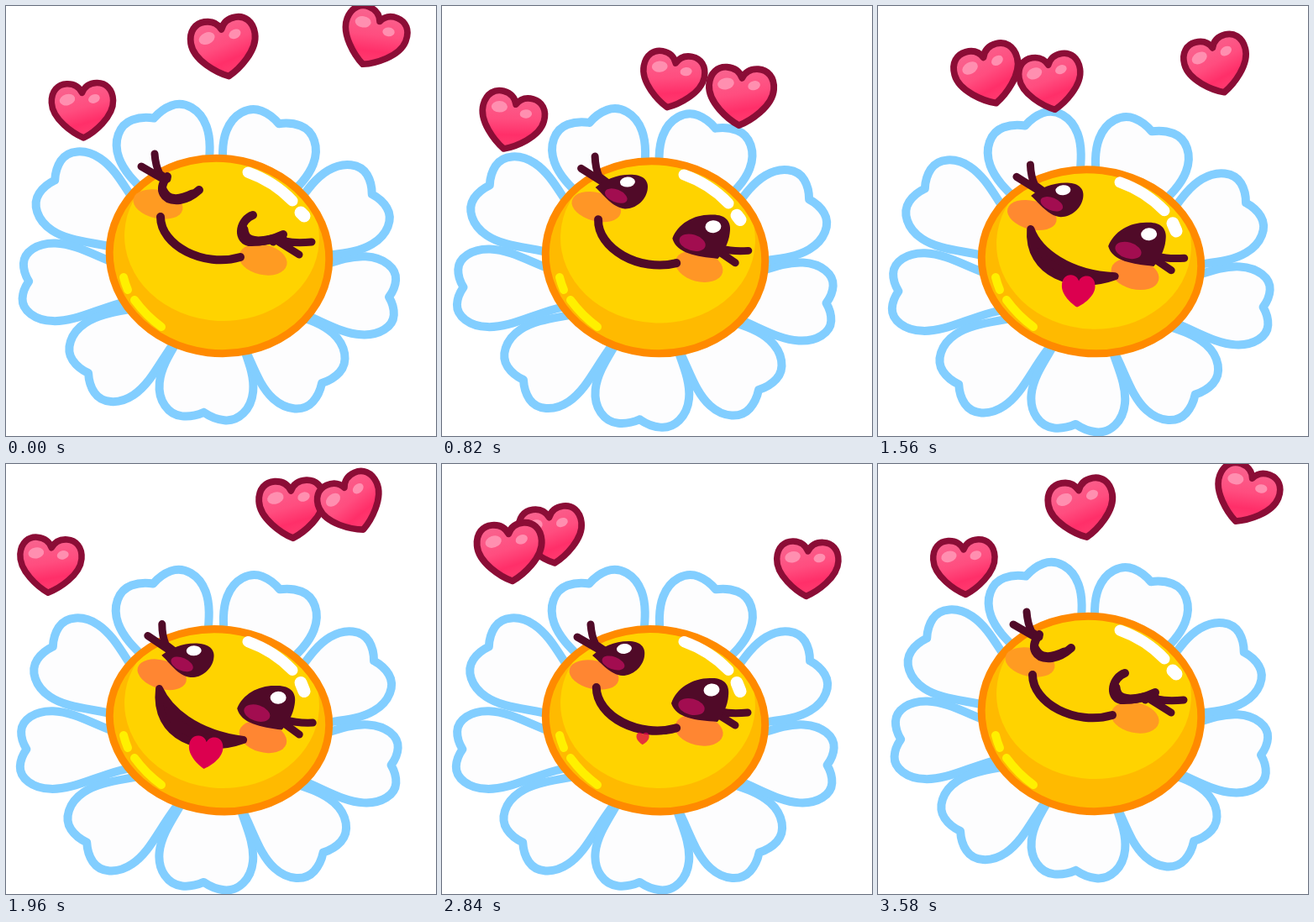
Animation, 512 px wide and 512 px high, one loop 3600 ms. Source, as an HTML page with a canvas:

```html
<!DOCTYPE html>
<html lang="en">
<head>
<meta charset="utf-8">
<title>Happy daisy</title>
<style>
html, body { margin: 0; width: 100%; height: 100%; overflow: hidden; background: #fff; }
canvas { display: block; width: 100vmin; height: 100vmin; }
</style>
</head>
<body>
<canvas id="stage" width="512" height="512"></canvas>
<script>
const ctx = document.getElementById('stage').getContext('2d');
const LOOP = 3600;
const DARK = '#500a28';
const RAD = Math.PI / 180;
const mix = (a, b, k) => a + (b - a) * k;
const cosd = deg => Math.cos(deg * RAD);
const sind = deg => Math.sin(deg * RAD);

function rise(t, from, to) {
  const k = Math.min(1, Math.max(0, (t - from) / (to - from)));
  return k * k * (3 - 2 * k);
}
// Eases up from a to b, holds, eases down from c to d.
const pulse = (t, a, b, c, d) => rise(t, a, b) - rise(t, c, d);

function oval(x, y, rx, ry, turn, color) {
  ctx.beginPath();
  ctx.ellipse(x, y, rx, ry, turn, 0, 2 * Math.PI);
  ctx.fillStyle = color;
  ctx.fill();
}

function line(d, width, color) {
  ctx.lineWidth = width;
  ctx.strokeStyle = color;
  ctx.stroke(new Path2D(d));
}

function blob(d, color) {
  ctx.fillStyle = color;
  ctx.fill(new Path2D(d));
}

function placed(x, y, turn, sx, sy, draw) {
  ctx.save();
  ctx.translate(x, y);
  ctx.rotate(turn);
  ctx.scale(sx, sy);
  draw();
  ctx.restore();
}

function petal(len, half) {
  ctx.beginPath();
  for (const s of [-half, half]) {
    ctx.moveTo(0, 0);
    ctx.lineTo(0, .3 * s);
    ctx.bezierCurveTo(.35 * len, .45 * s, .54 * len, s, .76 * len, s);
    ctx.bezierCurveTo(.9 * len, s, len, .75 * s, len, .45 * s);
    ctx.bezierCurveTo(len, .25 * s, .975 * len, .1 * s, .955 * len, 0);
  }
  ctx.fillStyle = '#fdfdfe';
  ctx.lineWidth = 10;
  ctx.strokeStyle = '#82ceff';
  ctx.fill();
  ctx.stroke();
}

// Nine petal tips sit evenly on an ellipse; every petal points away from a hub below its centre.
function petals(sink) {
  const len = 155, tilt = 2.5;
  for (let i = 0; i < 9; i++) {
    const a = 210 - 40 * i;
    const ex = 225 * cosd(a), ey = 186 * sind(a);
    let x = 243 + ex * cosd(tilt) - ey * sind(tilt);
    let y = 305 + ex * sind(tilt) + ey * cosd(tilt);
    const dir = Math.atan2(y - 335, x - 250);
    x += .012 * sink * (x - 250);
    y += sink * (9 + .014 * (y - 130));
    placed(x - len * Math.cos(dir), y - len * Math.sin(dir), dir, 1, 1,
      () => petal(len, 46 + 10 * Math.abs(Math.sin(dir))));
  }
}

function head(squash) {
  const bottom = 413.5, top = 181.5 + 15.5 * squash;
  const disc = new Path2D();
  disc.ellipse(254, (top + bottom) / 2, 131, (bottom - top) / 2, .12, 0, 2 * Math.PI);
  ctx.fillStyle = '#ffba00';
  ctx.fill(disc);
  ctx.save();
  ctx.clip(disc);
  oval(257, 275 + 11 * squash, 116, 100, .05, '#ffd300');
  ctx.restore();
  ctx.lineWidth = 9;
  ctx.strokeStyle = '#ff8a00';
  ctx.stroke(disc);

  ctx.save();
  ctx.translate(0, 13.5 * squash);
  line('M288 198Q319 209 341 232', 13, '#fff');
  line(`M351 ${246 + squash}L355 ${250 + 7 * squash}`, 15, '#fff');
  ctx.restore();
  line('M140 323Q142 331 145 338', 10, '#fff000');
  line('M153 350Q167 369 185 382', 10, '#fff000');
}

function openEyes(open) {
  placed(210, 216, 0, 1, open, () => {
    blob('M-31 -3C-20 -13 -5 -20 12 -20C26 -20 33 -13 31 -2C29 11 17 21 5 21C-10 20 -20 6 -31 -3Z', DARK);
    oval(-6, 6, 14, 7.5, .35, '#a20d50');
    oval(7, -11, 9, 6, -.1, '#fff');
  });
  placed(308, 265, 0, 1, open, () => {
    blob('M-35 5C-29 -13 -10 -25 11 -25C27 -26 35 -18 33 -4C32 8 27 18 20 27C-6 25 -29 23 -35 5Z', DARK);
    oval(-11, 9, 16, 9.5, .25, '#a20d50');
    oval(13, -11, 9.5, 7.5, -.1, '#fff');
  });
}

function closedEyes() {
  line('M192 203C180 219 187 233 207 231Q219 229 230 219', 10, DARK);
  line('M187 220Q195 237 222 224', 11, DARK);
  line('M294 249C279 254 274 277 289 281Q309 282 330 272', 10, DARK);
  line('M283 266Q284 285 315 278', 11, DARK);
}

// The lips are two curves that coincide when the mouth is closed.
function mouth(open, tongue) {
  const at = (x, y, x2, y2) => `${mix(x, x2, open)} ${mix(y, y2, open)} `;
  const left = at(184, 251, 179, 253), right = at(279, 299, 283, 307);
  const shape = 'M' + left + 'C' + at(184, 285, 192, 277) + at(235, 312, 225, 303) + right +
    'C' + at(235, 312, 235, 328) + at(184, 285, 176, 312) + left + 'Z';
  blob(shape, DARK);
  line(shape, 10 - open, DARK);
  if (tongue < .02) return;
  ctx.globalAlpha = Math.min(1, 2 * tongue);
  placed(239, 304 + 21 * tongue, .03, tongue * .52, tongue * .56, () => {
    ctx.fillStyle = '#dc004f';
    ctx.fill(heartShape);
  });
  ctx.globalAlpha = 1;
}

function face(t, squash) {
  const sway = pulse(t, 0, 480, 480, 1160) + .85 * pulse(t, 1160, 1960, 1960, 2420);
  const open = pulse(t, 580, 740, 3020, 3180);
  const grin = pulse(t, 740, 1900, 2420, 2900);
  const tongue = pulse(t, 740, 1640, 2420, 3140);
  ctx.save();
  ctx.translate(187, 305 + 15 * squash);
  ctx.rotate(.08 * sway);
  ctx.translate(-187, -305);
  const blush = `rgb(255,${Math.round(mix(155, 134, squash))},${Math.round(mix(34, 50, squash))})`;
  oval(181, 236, 30, 17, .22, blush);
  oval(306, 302, 29, 18, .22, blush);
  line('M177 176Q178 190 183 200L192 206', 9, DARK);
  line('M161 191L187 206', 9, DARK);
  line('M318 281Q330 274 332 280Q345 283 364 281', 9, DARK);
  line('M325 281L349 296', 9, DARK);
  if (open > .25) openEyes(open);
  else closedEyes();
  mouth(grin, tongue);
  ctx.restore();
}

const heartShape = new Path2D(
  'M0 35C-13 29 -39 10 -39 -11C-39 -26 -30 -34 -19 -34C-9 -34 -3 -29 0 -22' +
  'C3 -29 9 -34 19 -34C30 -34 39 -26 39 -11C39 10 13 29 0 35Z');
const heartFill = ctx.createLinearGradient(-8, -32, 8, 32);
heartFill.addColorStop(0, '#f9628e');
heartFill.addColorStop(.45, '#ff4d7f');
heartFill.addColorStop(.75, '#ff2f69');
heartFill.addColorStop(1, '#ff3c70');

function heart({ x, y, turn, size }) {
  placed(x, y, turn * RAD, size, size, () => {
    ctx.fillStyle = heartFill;
    ctx.fill(heartShape);
    ctx.lineWidth = 8;
    ctx.strokeStyle = '#8b0d36';
    ctx.stroke(heartShape);
    oval(-19, -14, 10, 7, -.25, '#ff8fb0');
    oval(15, -14, 7.5, 5.5, -.3, '#ff8fb0');
  });
}

// Hearts circle a rocking halo twice per loop; angles are in degrees.
function hearts(t) {
  const once = 360 * t / LOOP, twice = 2 * once;
  const height = 93 - 16 * cosd(twice);
  const tilt = -15 + 35 * cosd(twice - 245) + 15 * cosd(2 * twice - 140);
  const depth = 15 + 9 * cosd(once);
  const drift = 14 * sind(3 * once) - 12 * sind(once);
  const rock = 12 * cosd(twice - 115);
  [
    { phase: 140, turn: 3 + rock, size: .94 },
    { phase: 275, turn: rock - 4, size: .99 },
    { phase: 5, turn: 25 * cosd(once - 30), size: .96 }
  ].map(item => {
    const angle = item.phase + twice + drift;
    const near = sind(angle), side = cosd(angle);
    return { ...item, near, x: 242 + 196 * side, y: height + tilt * side + depth * near };
  }).sort((a, b) => a.near - b.near).forEach(heart);
}

function draw(t) {
  ctx.fillStyle = '#fff';
  ctx.fillRect(0, 0, 512, 512);
  const squash = pulse(t, 350, 1900, 2840, 3520);
  petals(pulse(t, 200, 1300, 2840, 3540));
  head(squash);
  face(t, squash);
  hearts(t);
}

ctx.lineCap = ctx.lineJoin = 'round';
const start = performance.now();
function tick() {
  draw((performance.now() - start) % LOOP);
  requestAnimationFrame(tick);
}
tick();
</script>
</body>
</html>
```
